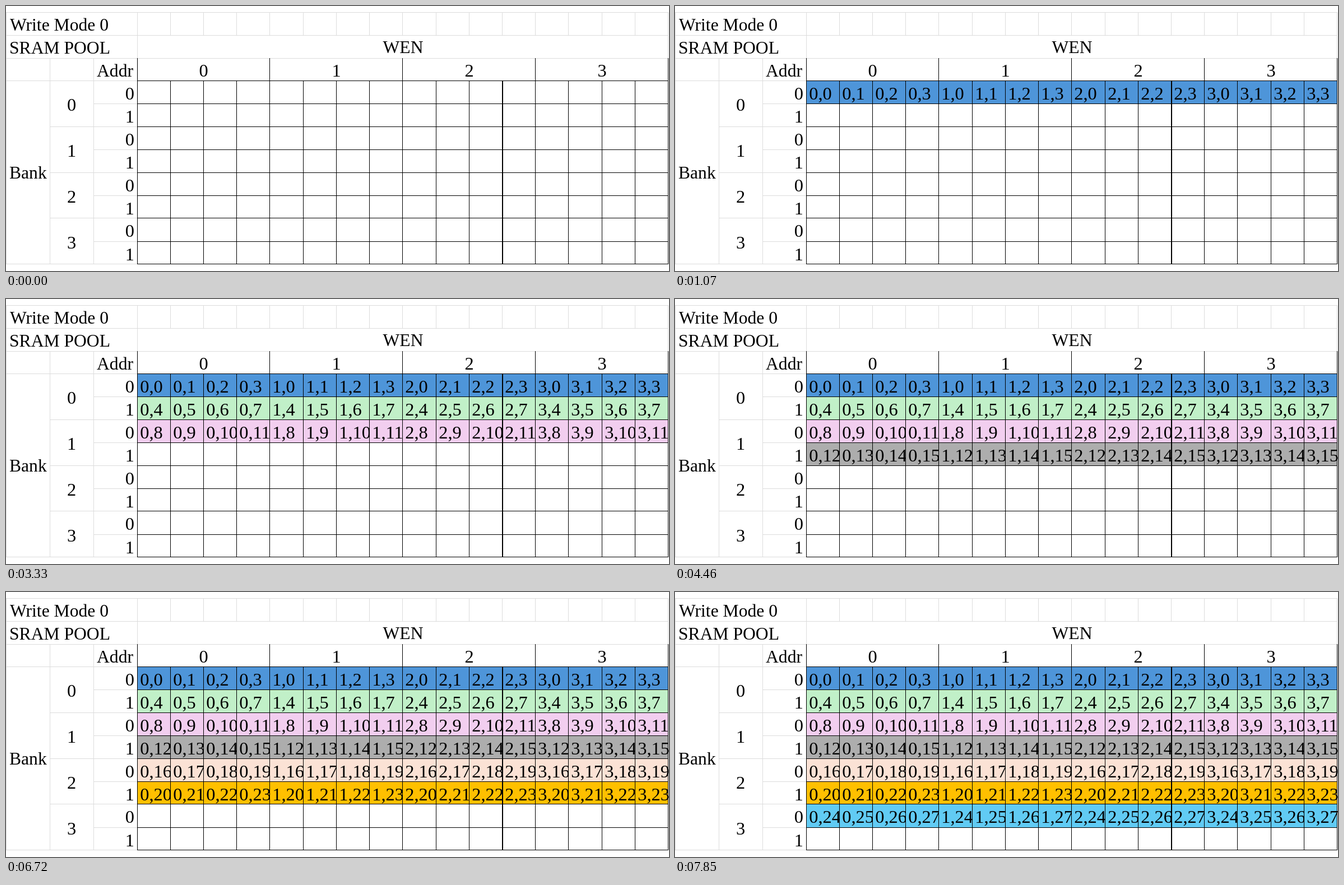
Animation, 1183 px wide and 473 px high, one loop 8 s. Source, as an HTML page:

```html
<!DOCTYPE html>
<html lang="en">
<head>
<meta charset="utf-8">
<title>Write Mode 0</title>
<style>
  html, body { margin: 0; width: 100%; height: 100%; overflow: hidden; background: #fff; }
  svg { display: block; }
  text { font: 31.6px "Liberation Serif", "Times New Roman", serif; fill: #000; white-space: pre; }
  .num { font-size: 32.4px; }
  .row { opacity: 0; }
</style>
</head>
<body>
<svg width="1183" height="473" viewBox="0 0 1183 473">
  <g id="fills"></g>
  <g id="lines" shape-rendering="crispEdges"></g>
  <g id="labels"></g>
</svg>
<script>
const LOOP = 8000, FIRST = 1070, STEP = 1130;
const GREY = '#dcdcdc', BLACK = '#000';
const ROW_COLORS = ['#4e95d9', '#c1f0c8', '#f2ceef', '#adadad', '#fbe2d5', '#ffc000', '#61cbf4'];
const rowY = [11, 52, 93, 133, 174, 215, 256, 297, 338, 378, 420, 460];
const colX = Array.from({ length: 17 }, (_, i) => Math.round(233.6 + 59.22 * i));
const tableLeft = colX[0], tableRight = colX[16];
const tableTop = rowY[3], tableBottom = rowY[11];

function add(parent, tag, attrs, content) {
  const el = document.createElementNS('http://www.w3.org/2000/svg', tag);
  for (const key in attrs) el.setAttribute(key, attrs[key]);
  if (content !== undefined) el.textContent = content;
  return parent.appendChild(el);
}

const [fillLayer, lineLayer, labelLayer] =
  ['fills', 'lines', 'labels'].map(id => document.getElementById(id));

const hLine = (y, x1, x2, fill) =>
  add(lineLayer, 'rect', { x: x1, y, width: x2 - x1 + 1, height: 1, fill });
const vLine = (x, y1, y2, fill, width = 1) =>
  add(lineLayer, 'rect', { x, y: y1, width, height: y2 - y1 + 1, fill });
const label = (content, x, y, anchor = 'start', cls = '') =>
  add(labelLayer, 'text', { x, y, 'text-anchor': anchor, class: cls }, content);

// Sheet gridlines
for (const y of rowY.slice(0, 3)) hLine(y, 0, tableRight, GREY);
for (const y of [tableTop, tableBottom]) hLine(y, 0, tableLeft, GREY);
for (let r = 4; r < 11; r++) hLine(rowY[r], r % 2 ? 78 : 156, tableLeft, GREY);
for (const x of colX) vLine(x, rowY[0], rowY[1], GREY);
for (const x of [tableLeft, tableRight]) vLine(x, rowY[1], rowY[2], GREY);
vLine(0, rowY[0], tableBottom, GREY);
for (const x of [78, 156]) vLine(x, rowY[2], tableBottom, GREY);

// Table borders
for (const y of rowY.slice(3)) hLine(y, tableLeft, tableRight, BLACK);
colX.forEach((x, i) =>
  vLine(x, i % 4 ? tableTop : rowY[2], tableBottom, BLACK, i === 11 ? 2 : 1));

// Headings
label('Write Mode 0', 7, 44);
label('SRAM POOL', 6, 85);
label('WEN', 708.5, 84, 'middle');
label('Addr', 194.5, 126, 'middle');
label('Bank', 6, 308);
for (let i = 0; i < 4; i++) {
  label(i, colX[4 * i + 2] + 0.5, 126, 'middle', 'num');
  label(i, 117, rowY[2 * i + 4] + 12.5, 'middle', 'num');
}
for (let r = 0; r < 8; r++) label(r % 2, 229, rowY[r + 3] + 34, 'end', 'num');

// Rows that fill in one after another; each cell clips its own text
let css = '';
ROW_COLORS.forEach((fill, r) => {
  const y = rowY[r + 3], height = rowY[r + 4] - y;
  const row = add(fillLayer, 'g', { class: 'row' });
  add(row, 'rect', { x: tableLeft, y, width: tableRight - tableLeft + 1, height, fill });
  for (let c = 0; c < 16; c++) {
    const width = c < 15 ? colX[c + 1] - colX[c] : 62;
    const cell = add(row, 'svg', { x: colX[c], y, width, height, overflow: 'hidden' });
    add(cell, 'text', { x: 5.2, y: 34, class: 'num' }, `${c >> 2},${4 * r + c % 4}`);
  }
  const start = (FIRST + STEP * r) / LOOP * 100;
  css += `@keyframes row${r} { 0% { opacity: 0 } ${start}%, 100% { opacity: 1 } }\n`;
  row.style.animation = `row${r} ${LOOP}ms step-end infinite`;
});
document.head.appendChild(document.createElement('style')).textContent = css;
</script>
</body>
</html>
```
